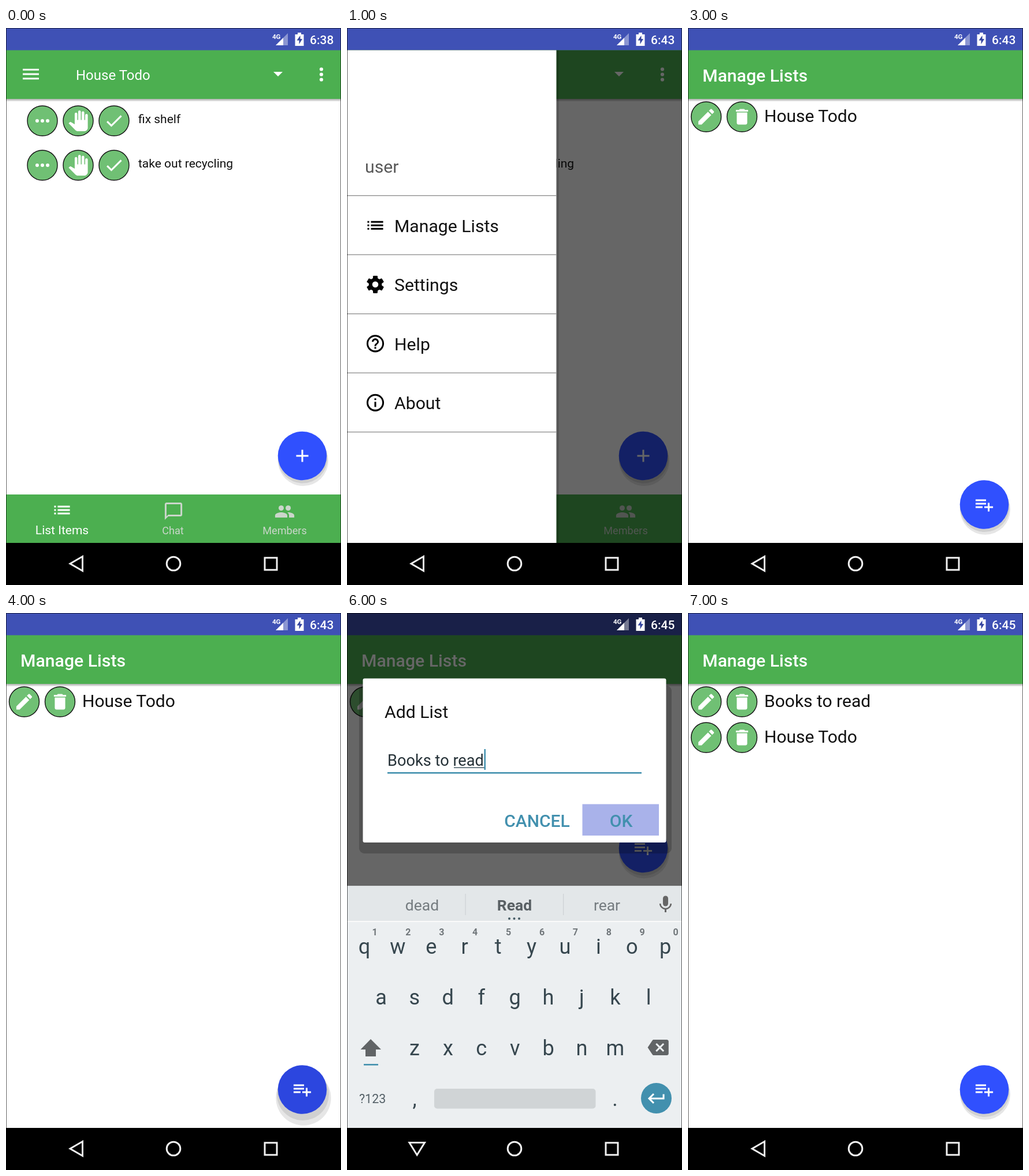
Recreate the animation shown at these times as an HTML page. Size 580 by 966 pixels, loop 8 s.

```html
<!DOCTYPE html>
<html lang="en">
<head>
<meta charset="utf-8">
<title>Todo lists</title>
<style>
  html, body { margin: 0; width: 100%; height: 100%; overflow: hidden; background: #fff; }
  svg { display: block; width: 580px; height: 966px; font-family: Roboto, sans-serif; }
</style>
</head>
<body>
<svg id="stage" viewBox="0 0 580 966"></svg>
<script>
const GREEN = '#4caf50', BLUE = '#3050fe', TEAL = '#4290ae', MUTED = '#cbd6cb';
const DP = 1.509; // pixels per density-independent pixel

const path = d => `<path d="${d}"/>`;
const ring = '<circle cx="12" cy="12" r="9" fill="none" stroke="#000" stroke-width="2"/>';
const gearTeeth = [0, 60, 120, 180, 240, 300]
  .map(a => `<path transform="rotate(${a} 12 12)" d="M9 6.5L9.5 2.4Q9.6 2 10 2H14Q14.4 2 14.5 2.4L15 6.5z"/>`).join('');

// Icons live in a 24 x 24 box
const ICONS = {
  menu: path('M3 6h18v2H3zM3 11h18v2H3zM3 16h18v2H3z'),
  more: [6, 12, 18].map(x => `<circle cx="${x}" cy="12" r="2"/>`).join(''),
  hand: path('M23 5.5V20c0 2.2-1.8 4-4 4h-7.3c-1.08 0-2.1-.43-2.85-1.19L1 14.83s1.26-1.23 1.3-1.25c.5-.4 1-.35 1.39-.13L8 15.91V4a1.5 1.5 0 0 1 3 0v7h1V1.5a1.5 1.5 0 0 1 3 0V11h1V2.5a1.5 1.5 0 0 1 3 0V11h1V5.5a1.5 1.5 0 0 1 3 0z'),
  check: path('M9 16.17L4.83 12l-1.42 1.41L9 19 21 7l-1.41-1.41z'),
  plus: path('M19 13h-6v6h-2v-6H5v-2h6V5h2v6h6z'),
  list: path('M3 7h2v2H3zM3 11h2v2H3zM3 15h2v2H3zM7 7h14v2H7zM7 11h14v2H7zM7 15h14v2H7z'),
  chat: path('M20 2H4c-1.1 0-2 .9-2 2v18l4-4h14c1.1 0 2-.9 2-2V4c0-1.1-.9-2-2-2zm0 14H6l-2 2V4h16z'),
  group: '<circle cx="8" cy="8" r="3"/><circle cx="16" cy="8" r="3"/>' +
    path('M8 13c-2.33 0-7 1.17-7 3.5V19h14v-2.5c0-2.33-4.67-3.5-7-3.5zM16 13c-.29 0-.62.02-.97.05 1.16.84 1.97 1.97 1.97 3.45V19h6v-2.5c0-2.33-4.67-3.5-7-3.5z'),
  gear: '<circle cx="12" cy="12" r="5.5" fill="none" stroke="#000" stroke-width="4"/>' + gearTeeth,
  help: ring + path('M11 16h2v2h-2zM12 6c-2.21 0-4 1.79-4 4h2c0-1.1.9-2 2-2s2 .9 2 2c0 2-3 1.75-3 5h2c0-2.25 3-2.5 3-5 0-2.21-1.79-4-4-4z'),
  info: ring + path('M11 7h2v2h-2zM11 11h2v6h-2z'),
  edit: path('M3 17.25V21h3.75L17.81 9.94l-3.75-3.75zM20.71 7.04c.39-.39.39-1.02 0-1.41l-2.34-2.34c-.39-.39-1.02-.39-1.41 0l-1.83 1.83 3.75 3.75z'),
  trash: path('M6 19c0 1.1.9 2 2 2h8c1.1 0 2-.9 2-2V7H6zM19 4h-3.5l-1-1h-5l-1 1H5v2h14z'),
  addList: path('M2 6h12v2H2zM2 10h12v2H2zM2 14h8v2H2zM18 14v-4h-2v4h-4v2h4v4h2v-4h4v-2z'),
  mic: '<rect x="9" y="2" width="6" height="12" rx="3"/>' +
    path('M17.3 11c0 3-2.54 5.1-5.3 5.1S6.7 14 6.7 11H5c0 3.41 2.72 6.23 6 6.72V21h2v-3.28c3.28-.48 6-3.3 6-6.72z'),
  enter: path('M19 7v4H5.83l3.58-3.59L8 6l-6 6 6 6 1.41-1.41L5.83 13H21V7z'),
  erase: path('M22 3H7c-.69 0-1.23.35-1.59.88L0 12l5.41 8.11c.36.53.9.89 1.59.89h15c1.1 0 2-.9 2-2V5c0-1.1-.9-2-2-2zm-3 12.59L17.59 17 14 13.41 10.41 17 9 15.59 12.59 12 9 8.41 10.41 7 14 10.59 17.59 7 19 8.41 15.41 12z')
};

const rect = (x, y, w, h, fill, extra = '') =>
  `<rect x="${x}" y="${y}" width="${w}" height="${h}" fill="${fill}" ${extra}/>`;
const circle = (x, y, r, fill, extra = '') => `<circle cx="${x}" cy="${y}" r="${r}" fill="${fill}" ${extra}/>`;
const text = (x, y, size, fill, str, extra = '') =>
  `<text x="${x}" y="${y}" font-size="${size}" fill="${fill}" ${extra}>${str}</text>`;
const icon = (name, x, y, fill = '#fff', scale = DP) =>
  `<g fill="${fill}" transform="translate(${x} ${y}) scale(${scale}) translate(-12 -12)">${ICONS[name]}</g>`;
const middle = 'text-anchor="middle"', medium = 'font-weight="500"', bold = 'font-weight="700"';
const scrim = (y, h) => rect(0, y, 580, h, '#000', 'opacity=".6"');

const statusIcons = time =>
  text(461, 18.5, 11.5, '#fff', '4G', bold) +
  '<path d="M467 30H488V9z" fill="#fff" opacity=".4"/><path d="M467 30H480V17z" fill="#fff"/>' +
  '<path d="M505 8h6v3h4.500v20h-15v-20H505z" fill="#fff"/><path d="M509.500 13l-6 8.500h4v6.500l5.500-9h-3.500z" fill="#3545a0"/>' +
  text(526, 28, 21, '#fff', time, medium);

const systemNav = keyboardOpen =>
  rect(0, 893, 580, 73, '#000') +
  `<g fill="none" stroke="#f0f0f0" stroke-width="3">
    <path d="${keyboardOpen ? 'M108 918.500H134.500L121.200 940z' : 'M111 929L132.500 916.500V941.500z'}"/>
    <circle cx="290" cy="929" r="11.800"/><rect x="448" y="918.800" width="21" height="21"/></g>`;

const appBar = () =>
  rect(0, 0, 580, 39, '#3f51b5') + rect(0, 38.5, 580, 84.5, GREEN) +
  rect(0, 123, 580, 2, '#bdbdbd') + rect(0, 125, 580, 2, '#dcdcdc');

const roundButton = (name, x, y) =>
  circle(x, y, 26, '#70c074', 'stroke="#111" stroke-width="1.4"') + icon(name, x, y);

const fab = (name, y, pressed) =>
  (pressed
    ? circle(515, y + 14.5, 47.7, '#e6e6e6') + circle(514, y + 8.5, 45, '#d0d0d0')
    : circle(514.5, y + 8.7, 43.5, '#e6e6e6') + circle(513.7, y + 4.5, 43, '#d0d0d0')) +
  circle(513, y, 42.3, pressed ? '#2c46df' : BLUE) + icon(name, 513, y);

const todoRow = (label, y) =>
  roundButton('more', 63, y) + roundButton('hand', 125, y) + roundButton('check', 187, y) +
  text(229, y + 4, 21, '#111', label);

const home = () =>
  appBar() + icon('menu', 43, 80, '#fff', 1.55) +
  text(121, 90, 24, '#fff', 'House Todo') +
  '<path d="M463 76H479L471 84z" fill="#fff"/>' +
  [71.5, 80.5, 89.5].map(y => circle(546, y, 3.1, '#fff')).join('') +
  todoRow('fix shelf', 161) + todoRow('take out recycling', 238) +
  fab('plus', 742) +
  rect(0, 809, 580, 84, GREEN) +
  icon('list', 97, 836) + text(97, 878, 21, '#fff', 'List Items', middle) +
  icon('chat', 290, 838, MUTED) + text(289, 878, 18.1, MUTED, 'Chat', middle) +
  icon('group', 482.5, 838.5, MUTED) + text(482.5, 878, 18.1, MUTED, 'Members', middle);

const drawer = highlighted => {
  const items = [['list', 'Manage Lists'], ['gear', 'Settings'], ['help', 'Help'], ['info', 'About']];
  const line = y => rect(0, y, 362.5, 1.3, '#8c8c8c');
  return scrim(38.5, 854.5) + rect(362, 38.5, 5, 854.5, '#000', 'opacity=".15"') +
    rect(0, 38.5, 362.5, 854.5, '#fff') + text(31, 251, 30.2, '#595959', 'user') +
    (highlighted ? rect(0, 291, 362.5, 102, '#d5dbff') : '') + line(290) +
    items.map(([name, label], i) => {
      const y = 342 + i * 102.5;
      return icon(name, 49, y + .3, '#000') + text(82, y + 11.5, 30.2, '#111', label) + line(y + 50.5);
    }).join('');
};

const manage = (lists, fabY = 826.5, pressed = false) =>
  appBar() + text(25, 92.5, 30.2, '#fff', 'Manage Lists', medium) +
  lists.map((label, i) => {
    const y = 154 + i * 62;
    return roundButton('edit', 31.5, y) + roundButton('trash', 93.5, y) + text(132, y + 9, 30, '#111', label);
  }).join('') + fab('addList', fabY, pressed);

const keyboard = typed => {
  const keyRow = (letters, x, y) => [...letters].map((c, i) =>
    text(x + i * 57.9, y, 36.2, '#37474f', c, middle)).join('');
  const action = typed ? '#616466' : '#9ea4ac';
  const suggestions = text(130, 516, 26.5, '#747b7f', 'dead', middle) +
    text(290, 516, 26.5, '#596064', 'Read', middle + ' ' + bold) +
    text(450, 516, 26.5, '#747b7f', 'rear', middle) +
    [281, 289.5, 298].map(x => circle(x, 530, 2, '#455a64')).join('');
  return rect(0, 473.5, 580, 419.5, '#eceff1') + rect(0, 473.5, 580, 61, '#e3e7e9') +
    rect(0, 534, 580, 2, '#fafafa') +
    [204.5, 374].map(x => rect(x, 487, 1.2, 37, '#cdd2d5')).join('') +
    (typed ? suggestions : '') + icon('mic', 551.5, 505.5, '#666') +
    [...'1234567890'].map((c, i) => text(48 + i * 57.9, 559, 16, '#70767a', c, middle + ' ' + bold)).join('') +
    keyRow('qwertyuiop', 30, 591) + keyRow('asdfghjkl', 59, 679) + keyRow('zxcvbnm', 117, 767) +
    `<path d="M41 739L59 757H50V769H32V757H23.500z" fill="${action}"/>` +
    rect(29, 782, 25, 2.6, typed ? TEAL : action) + icon('erase', 538.7, 753.5, action) +
    text(21, 850, 21.4, '#546067', '?123') +
    text(117, 855, 36.2, '#37474f', ',', middle) + text(464, 855, 36.2, '#37474f', '.', middle) +
    rect(151, 825, 279.5, 34.5, '#d0d4d6', 'rx="5"') +
    circle(535.5, 841.5, 26.5, TEAL) + icon('enter', 536, 842);
};

const dialog = typed =>
  manage(['House Todo'], 408) + scrim(0, 473.5) +
  rect(21, 126, 541, 291, '#000', 'rx="9" opacity=".2"') +
  rect(27.5, 113.5, 525, 284.5, '#fff', 'rx="3"') +
  text(65, 182, 30.2, '#111', 'Add List') +
  (typed
    ? text(70, 265, 27.2, '#263238', 'Books to read') + rect(185, 267.5, 54, 1.5, '#455a64')
    : text(70, 265, 27.2, '#737373', 'List name (ex: Grocery Shopping)')) +
  rect(typed ? 237.5 : 70.5, 236, 2.5, 36, typed ? TEAL : '#5b8fd0') +
  rect(70, 276, 440, 2.6, TEAL) +
  (typed ? rect(407.5, 331.5, 132.5, 54.5, '#a9b2ea') : '') +
  text(329, 371, 30, TEAL, 'CANCEL', middle + ' ' + medium) +
  text(474.5, 371, 30, TEAL, 'OK', middle + ' ' + medium) +
  keyboard(typed);

const screen = (content, time, keyboardOpen = false) =>
  rect(0, 0, 580, 966, '#fff') + content + statusIcons(time) + systemNav(keyboardOpen) +
  '<rect x=".5" y=".5" width="579" height="965" fill="none" stroke="#000" opacity=".6"/>';

const scenes = [
  screen(home(), '6:38'),
  screen(home() + drawer(false), '6:43'),
  screen(home() + drawer(true), '6:43'),
  screen(manage(['House Todo']), '6:43'),
  screen(manage(['House Todo'], 826.5, true), '6:43'),
  screen(dialog(false), '6:43', true),
  screen(dialog(true), '6:45', true),
  screen(manage(['Books to read', 'House Todo']), '6:45')
];

const stage = document.getElementById('stage');
const start = performance.now();
let shown = -1;

function draw() {
  const index = Math.floor((performance.now() - start) / 1000) % scenes.length;
  if (index !== shown) stage.innerHTML = scenes[shown = index];
  requestAnimationFrame(draw);
}
draw();
</script>
</body>
</html>
```
